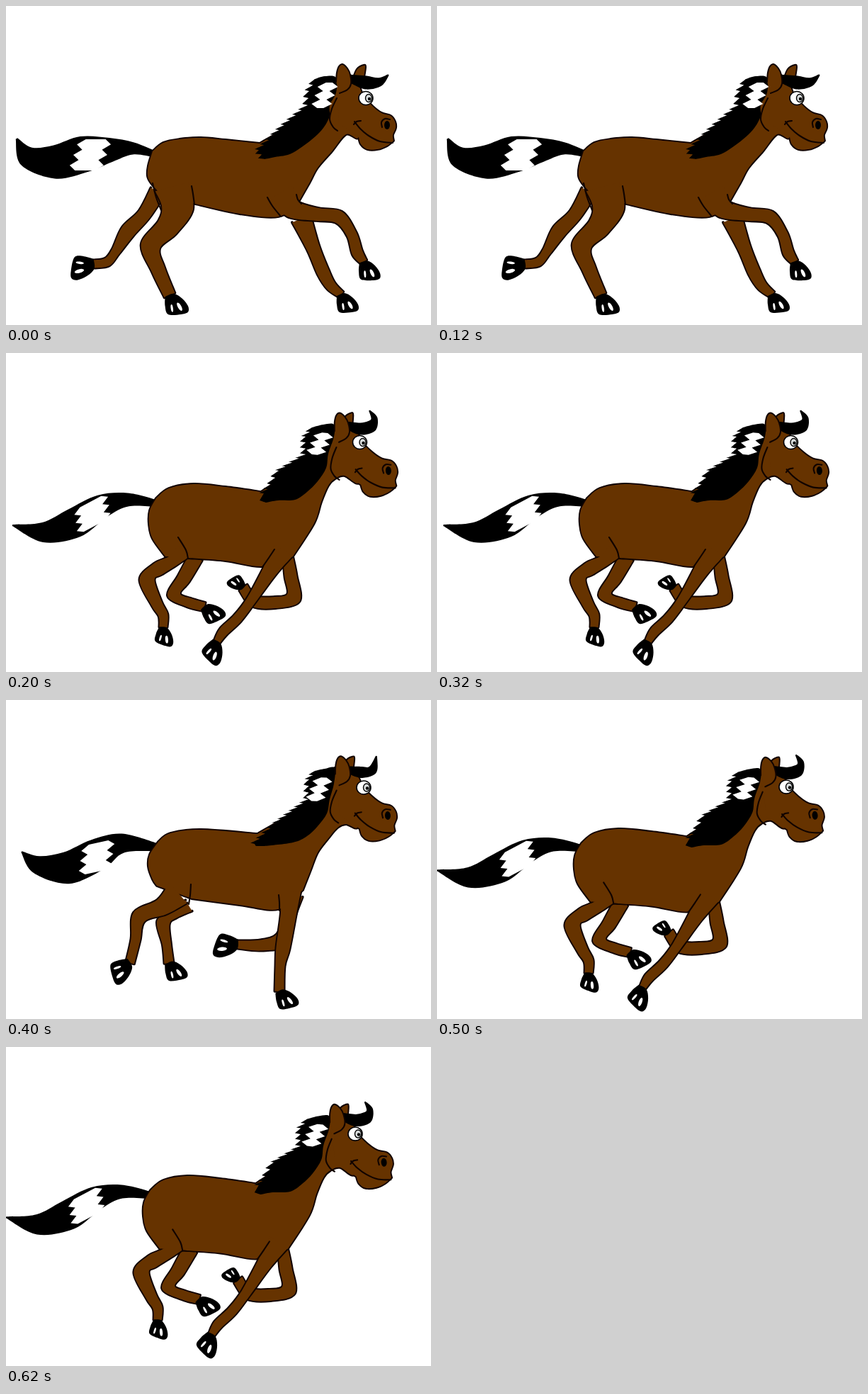
An HTML page for the animation above (0.7 s loop, 600 px wide and 450 px high).

```html
<!DOCTYPE html>
<html lang="en">
<head>
<meta charset="utf-8">
<title>Galloping horse</title>
<style>
html, body { margin: 0; width: 100%; height: 100%; overflow: hidden; background: #fff; }
svg { display: block; width: 100vw; height: 100vh; }
g { stroke-linejoin: round; stroke-linecap: round; }
.rim { fill: none; stroke: #100300; stroke-width: 3.8; }
.coat { fill: #663300; }
.ear { fill: #663300; stroke: #100300; stroke-width: 2; }
.line { fill: none; stroke: #100300; stroke-width: 2.1; }
.white { fill: #fff; }
</style>
</head>
<body>
<svg id="stage" viewBox="0 0 600 450"></svg>
<script>
// Outlines are "x,y" points with "/" at corners; bones are "x,y,width" joints.
// Legs end in a hoof with its own angle and size.
const reach = {
  head: '', eye: [508, 130], lean: 0,
  torso: '207,205 222,193 245,188 275,186 310,189 358,194 / 430,150 465,103 / 490,130 / 498,184 480,181 460,205 440,228 428,250 412,278 / 385,297 330,293 267,279 / 215,262 / 205,250 200,240 201,225 207,205',
  far: [
    { bones: '214,262,24 195,294,20 172,318,22 155,346,14 143,361,14 124,364,13', angle: 105, size: 1.15 },
    { bones: '417,300,30 434,342,20 448,376,19 459,395,16 473,407,12', angle: 0, size: 1 }
  ],
  near: [
    { bones: '234,255,50 242,285,46 228,312,33 204,339,29 215,372,21 231,408,18', angle: 0, size: 1.08 },
    { bones: '390,262,36 404,286,28 440,294,20 470,298,20 488,322,16 496,348,17 505,361,12', angle: 4, size: 1 }
  ],
  creases: ['262,254 264,265 266,280', '207,250 212,270 219,288', '369,270 376,282 388,297', '410,266 412,273 417,279'],
  tail: '15,187,2 29,212,28 68,220,46 110,209,50 148,203,33 180,201,16 210,209,8',
  patch: [119, 210, 0, 36, 44],
  teeth: '436,103 425,120 423,140 390,168 354,203 362,216',
  neck: '380,213 405,207 440,181 456,158 457,140 466,122 466,101 450,99 436,103',
  forelock: '485,102,10 508,108,18 528,107,11 540,97,1',
  blaze: [450, 126, 0, 17, 36]
};

const gather = {
  head: 'rotate(-4 510 140)', eye: [499.5, 126], lean: -14,
  torso: '212,205 230,191 265,185 310,189 360,196 / 435,145 465,101 / 490,130 / 498,182 478,173 465,177 455,187 445,210 435,240 405,287 / 362,301 310,293 256,289 / 225,287 / 207,262 202,242 203,222 212,205',
  far: [
    { bones: '268,288,22 251,318,20 237,341,20 258,352,15 280,358,14', angle: -20, size: 1 },
    { bones: '398,288,16 402,315,19 406,345,22 380,352,18 350,350,18 335,331,16', angle: 155, size: .75 }
  ],
  near: [
    { bones: '250,280,24 236,293,18 214,305,21 199,320,23 213,354,17 222,370,15 222,387,13', angle: 25, size: .9 },
    { bones: '392,278,32 372,308,22 346,349,15 327,374,15 307,393,15 298,407,11', angle: 50, size: 1.05 }
  ],
  creases: ['243,260 254,278 257,290', '379,277 371,289 362,302'],
  tail: '9,243,1 52,253,27 96,240,41 136,216,32 172,207,18 212,212,9',
  patch: [122, 227, -28, 42, 33],
  teeth: '432,105 420,118 420,143 382,166 372,186 361,198 364,211',
  neck: '384,208 408,207 425,196 440,181 452,162 455,142 463,118 463,101 448,101 432,105',
  forelock: '482,102,10 500,107,16 516,103,16 520,92,8 513,81,1',
  blaze: [443, 128, 6, 16, 32]
};

const land = {
  head: 'translate(0 -4) rotate(-2 510 140)', eye: [505, 123.5], lean: -14,
  torso: '215,200 232,188 275,183 355,189 / 435,140 464,96 / 490,130 / 497,178 480,175 468,180 455,195 440,215 430,240 419,268 / 385,295 330,289 262,280 / 213,262 / 207,253 201,235 203,218 215,200',
  far: [
    { bones: '258,290,20 238,302,14 222,314,20 227,345,14 230,371,15', angle: -5, size: 1 },
    { bones: '408,275,24 400,305,18 390,338,24 360,346,17 327,345,13', angle: 115, size: 1.15 }
  ],
  near: [
    { bones: '243,272,40 220,292,26 188,306,22 183,338,15 175,371,14', angle: 80, size: 1.1 },
    { bones: '401,270,32 399,300,24 391,350,21 387,375,15 386,411,15', angle: -8, size: 1 }
  ],
  creases: ['261,260 260,275 258,288', '385,275 386,286 386,297'],
  tail: '22,214,1 43,232,24 85,237,44 129,218,44 165,202,26 214,208,10',
  patch: [128, 222, -12, 36, 40],
  teeth: '436,100 425,112 424,140 378,174 348,203 362,206',
  neck: '405,201 425,192 440,178 453,160 457,140 463,118 464,96 450,97 436,100',
  forelock: '485,99,10 503,102,15 518,98,12 523,79,1',
  blaze: [442, 126, 3, 16, 34]
};

const skull = '467,110 475,101 488,99 498,112 504,126 517,141 530,151 543,155 549,163 550,172 546,182 547,190 / 538,197 525,202 510,202 501,195 498,185 / 470,165';
const face = ['492,163 500,173 512,183 528,191 546,193', '491,167 495,163 501,162', '467,130 460,145 457,160 462,171 468,176', '531,171 530,164 535,159 542,160'];
const frontEar = '466,107 467,94 470,85 475,82 482,88 486,97 487,110 482,118 471,123';
const backEar = '488,106 495,89 505,83 508,86 505,106';
const hoofShape = '-6,2 5,-2 16,4 24,14 24,22 15,25 -2,25 -6,14 -6,2';

const read = s => s.trim().split(/\s+/).map(p => p.split(',').map(Number));

// Catmull-Rom runs joined at the corners.
function curve(text) {
  let last = null, d = '';
  for (const part of text.split('/')) {
    const pts = read(part);
    if (last) pts.unshift(last);
    else d = 'M' + pts[0];
    for (let i = 0; i < pts.length - 1; i++) {
      const b = pts[i], c = pts[i + 1], a = pts[i - 1] || b, e = pts[i + 2] || c;
      const out = b.map((v, k) => v + (c[k] - a[k]) / 6);
      const into = c.map((v, k) => v - (e[k] - b[k]) / 6);
      d += `C${out} ${into} ${c}`;
    }
    last = pts[pts.length - 1];
  }
  return d;
}

// Both sides of a chain of joints.
function ribbon(text, grow) {
  const joints = read(text), left = [], right = [];
  joints.forEach(([x, y, w], i) => {
    const a = joints[i - 1] || joints[i], b = joints[i + 1] || joints[i];
    const dx = b[0] - a[0], dy = b[1] - a[1];
    const k = Math.max(w + grow, 0) / 2 / Math.hypot(dx, dy);
    left.push([x + dy * k, y - dx * k]);
    right.unshift([x - dy * k, y + dx * k]);
  });
  return `${left.join(' ')} / ${right[0]} / ${right.slice(1).join(' ')}`;
}

const shape = (kind, text, move = '') => `<path class="${kind}" transform="${move}" d="${curve(text)}"/>`;
const oval = (x, y, rx, ry, look, turn = 0) =>
  `<ellipse cx="${x}" cy="${y}" rx="${rx}" ry="${ry}" transform="rotate(${turn} ${x} ${y})" ${look}/>`;

// One outline around several overlapping parts.
const merge = parts => ['rim', 'coat'].map(kind => parts.map(([t, move]) => shape(kind, t, move)).join('')).join('');

const limb = leg => [ribbon(leg.bones, -1.8)];

function hoof({ bones, angle, size }) {
  const [x, y] = read(bones).pop();
  return `<g transform="translate(${x} ${y}) rotate(${angle}) scale(${size})">` +
    shape('', hoofShape) +
    oval(3, 17, 1.5, 5, 'class="white"', -8) +
    oval(13, 15, 2.3, 6, 'class="white"', -30) + '</g>';
}

// White band with jagged sides, leaning back.
function band([x, y, angle, w, h]) {
  const n = 7, side = sign => Array.from({ length: n }, (_, i) => {
    const v = h * (i / (n - 1) - .5);
    const tooth = i % 2 ? 6 : -4;
    return [sign * (w / 2 + tooth) - v * .35, v];
  });
  const pts = [...side(-1), ...side(1).reverse()];
  return `<polygon class="white" transform="translate(${x} ${y}) rotate(${angle})" points="${pts.join(' ')}"/>`;
}

// Hair tufts along the back of the neck, then the smooth front edge.
function mane(p) {
  const edge = read(p.teeth), tufts = [];
  for (let i = 0; i < edge.length - 1; i++) {
    const [x, y] = edge[i], dx = edge[i + 1][0] - x, dy = edge[i + 1][1] - y;
    const n = Math.max(1, Math.round(Math.hypot(dx, dy) / 10));
    for (let j = 0; j < n; j++) {
      const at = f => [x + dx * f / n, y + dy * f / n];
      const tip = at(j + .7), dip = at(j + 1);
      tufts.push([tip[0] - 5, tip[1] + 1], [dip[0] + 3, dip[1]]);
    }
  }
  return shape('', `${edge[0]} / ${tufts.join(' / ')} / ${p.neck}`);
}

function horse(p) {
  const [ex, ey] = p.eye;
  return [
    shape('', ribbon(p.tail, 1)), band(p.patch),
    merge(p.far.map(limb)), p.far.map(hoof).join(''),
    shape('ear', backEar, `${p.head} translate(${p.lean} 0)`),
    merge([[p.torso], [skull, p.head], ...p.near.map(limb)]),
    p.near.map(hoof).join(''),
    p.creases.map(c => shape('line', c)).join(''),
    mane(p), band(p.blaze),
    oval(ex, ey, 10, 9.5, 'fill="#fff" stroke="#000" stroke-width="1.6"'),
    oval(ex + 4, ey, 4.5, 5.5, 'fill="#d8dcdc" stroke="#000" stroke-width="1.4"'),
    oval(ex + 5, ey + 1, 2.2, 2.2, ''),
    shape('', ribbon(p.forelock, 1)),
    `<g transform="${p.head}">`,
    shape('ear', frontEar), face.map(f => shape('line', f)).join(''),
    oval(538, 168, 4, 6, ''),
    '</g>'
  ].join('');
}

const LOOP = 700;
const steps = [
  { until: 200, pose: reach },
  { until: 400, pose: gather },
  { until: 500, pose: land },
  { until: 700, pose: gather, move: 'matrix(1.005 0 0 1.006 -9 -4.2)' }
];

const stage = document.getElementById('stage');
stage.innerHTML = steps.map(s => `<g transform="${s.move || ''}">${horse(s.pose)}</g>`).join('');
const views = [...stage.children];

function draw(ms) {
  const now = steps.findIndex(s => ms % LOOP < s.until);
  views.forEach((v, i) => v.setAttribute('display', i === now ? 'inline' : 'none'));
}

const start = performance.now();
function tick() {
  draw(performance.now() - start);
  requestAnimationFrame(tick);
}
tick();
</script>
</body>
</html>
```
